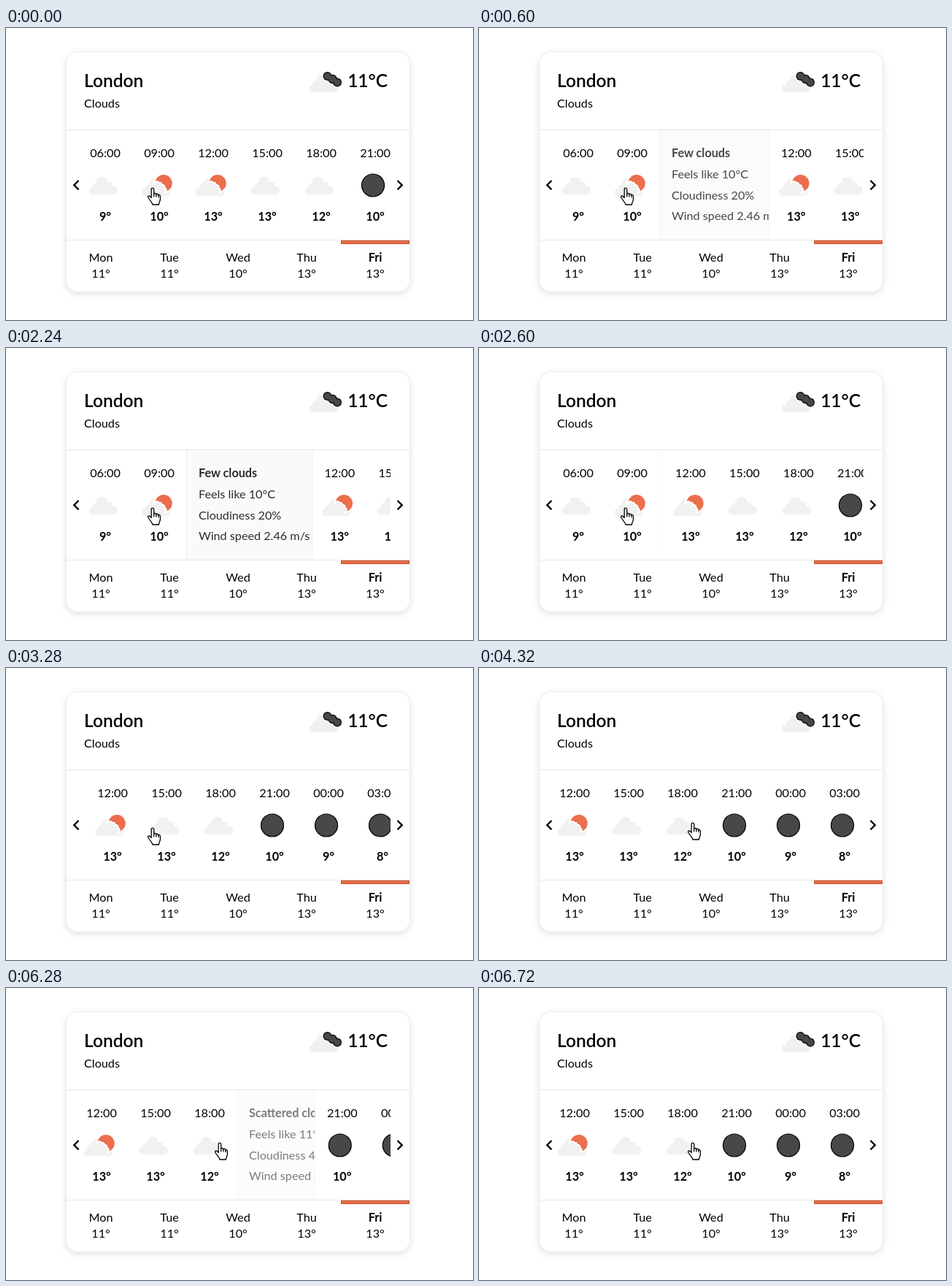
An HTML page that plays this animation: 640x400 px, repeating every 6.84 s.

```html
<!DOCTYPE html>
<html lang="en">
<head>
<meta charset="utf-8">
<title>Weather card</title>
<style>
  html, body { margin: 0; width: 100%; height: 100%; overflow: hidden; background: #fff; }
  #stage { display: block; width: 640px; height: 400px; font: 16.2px Lato, "Open Sans", sans-serif; fill: #000; }
  .mid { text-anchor: middle; }
  .bold { font-weight: 700; }
  .big { font-size: 24.5px; font-weight: 600; }
  .card { fill: #fff; stroke: #ededed; filter: drop-shadow(0 3px 5px rgba(0, 0, 0, .11)); }
  .rule { stroke: #e8e8e8; }
  .chevron { fill: none; stroke: #000; stroke-width: 2.4; }
</style>
</head>
<body>
<svg id="stage" viewBox="0 0 640 400" xmlns="http://www.w3.org/2000/svg"></svg>
<script>
const LOOP = 6840, STEP = 40;
const CELL = 74, STRIP_X = 99, PANEL_W = 209, MAX_SCROLL = 153;

const hours = [
  ["06:00", "cloud", 9], ["09:00", "sun", 10], ["12:00", "sun", 13], ["15:00", "cloud", 13],
  ["18:00", "cloud", 12], ["21:00", "moon", 10], ["00:00", "moon", 9], ["03:00", "moon", 8]
];
const days = [["Mon", 11], ["Tue", 11], ["Wed", 10], ["Thu", 13], ["Fri", 13]];
const panels = [
  { after: 1, open: 360, close: 2160,
    lines: ["Few clouds", "Feels like 10°C", "Cloudiness 20%", "Wind speed 2.46 m/s"] },
  { after: 4, open: 4640, close: 6120,
    lines: ["Scattered clouds", "Feels like 11°C", "Cloudiness 44%", "Wind speed 2.27 m/s"] }
];
const PANEL_MS = 560;

const text = (x, y, s, cls = "") => `<text x="${x}" y="${y}" class="${cls}">${s}</text>`;
const circle = (x, y, r, attrs) => `<circle cx="${x}" cy="${y}" r="${r}" ${attrs}/>`;

const cloud = (x, y) =>
  `<path transform="translate(${x} ${y})" fill="#f1f1ef"
    d="M5 24C2 24 0 21.700 0 19C0 16 2.300 14 5 14C4.500 10.500 7 8 10 8.500C10.500 3.500 14 0 18 0
       C22.500 0 25.500 3 26 7C30 6 33 8.500 33 12.500C36.500 12.500 39.500 15.300 39.500 18.700C39.500 22 37 24 34 24Z"/>`;

const icons = {
  cloud: () => cloud(-22.5, 204),
  sun: () => cloud(-24, 206) +
    `<path fill="#ec6e4c" stroke="#fff" stroke-width="4" paint-order="stroke"
      d="M-5.500 210A11.800 11.800 0 1 1 10 223.800A4 4 0 0 0 8.500 218.500A4 4 0 0 0 4.500 214
         A4 4 0 0 0 0 210.800A4 4 0 0 0 -5.500 210Z"/>`,
  moon: () => circle(-3, 215.5, 15.5, 'fill="#48484a" stroke="#000" stroke-width="1.2"')
};

const lobes = [[440.5, 66, 5.2], [447.5, 70, 5.4], [454, 74.5, 5.2]];
const darkCloud = [["#fff", 2.5], ["#000", .8], ["#48484a", -.4]]
  .map(([fill, grow]) => lobes.map(([x, y, r]) => circle(x, y, r + grow, `fill="${fill}"`)).join("")).join("");
const headerIcon = cloud(415, 64) + darkCloud;

const hourCell = ([time, icon, temp]) =>
  `<g class="hour">${text(0, 177, time, "mid")}${icons[icon]()}${text(0, 264, temp + "°", "mid bold")}</g>`;

const panelBox = ({ lines }) =>
  `<svg class="panel" y="140" height="150" overflow="hidden">
    <rect width="100%" height="150" fill="#fafafa"/>
    ${lines.map((s, i) => text(17, 37 + i * 28.8, s, i ? "" : "bold")).join("")}
    <rect width="1" height="150" fill="#ebebeb"/>
    <svg x="100%" overflow="visible"><rect x="-1" width="1" height="150" fill="#ebebeb"/></svg>
  </svg>`;

const dayCell = ([name, temp], i) =>
  text(130 + i * 94, 320, name, i === 4 ? "mid bold" : "mid") + text(130 + i * 94, 342, temp + "°", "mid");

document.getElementById("stage").innerHTML = `
  <clipPath id="view"><rect x="107" y="140" width="420" height="150"/></clipPath>
  <rect class="card" x="82.5" y="32.5" width="471" height="329" rx="16"/>
  ${text(107, 81, "London", "big")}
  ${text(107, 109, "Clouds")}
  ${headerIcon}
  <text x="523" y="81" class="big" text-anchor="end">11°C</text>
  <g clip-path="url(#view)">${hours.map(hourCell).join("")}${panels.map(panelBox).join("")}</g>
  <path class="rule" d="M83 139.500H553M83 290.500H553"/>
  <path class="chevron" d="M99.500 209L93.300 215.200L99.500 221.400M536.500 209L542.700 215.200L536.500 221.400"/>
  <rect x="459.500" y="291.500" width="93" height="4" fill="#ec6e4c" stroke="#c24f2c"/>
  ${days.map(dayCell).join("")}
  <g id="hand" fill="#fff" stroke="#000" stroke-width="1.3" stroke-linejoin="round">
    <path d="M5.500 14V2.500C5.500 0 9 0 9 2.500V9C9.500 7.500 12 7.700 12.200 9.500C13 8.200 15 8.700 15.200 10.400
      C16.300 9.500 17.700 10.300 17.700 12V16C17.700 19 16 20 15.700 23.500H7.300C7 20.500 4 18.500 1.200 14
      C0 12 2 10.800 3.500 12Z"/>
    <path fill="none" d="M9 9V13M12.200 9.500V13M15.200 10.500V13.500"/>
  </g>`;

const hourEls = document.querySelectorAll(".hour");
const panelEls = document.querySelectorAll(".panel");
const hand = document.getElementById("hand");

const progress = (t, start, ms) => Math.min(1, Math.max(0, (t - start) / ms));

// cubic-bezier(.25, .1, .25, 1), solved by bisection
function ease(x) {
  if (x <= 0 || x >= 1) return x;
  let lo = 0, hi = 1, s;
  for (let i = 0; i < 24; i++) {
    s = (lo + hi) / 2;
    if (.75 * s * (1 - s) + s ** 3 < x) lo = s; else hi = s;
  }
  return .3 * s * (1 - s) ** 2 + 3 * s * s * (1 - s) + s ** 3;
}
const easeOut = x => 1 - (1 - x) ** 4;
const easeInOut = x => x * x * (3 - 2 * x);

function draw(t) {
  const scroll = Math.round(MAX_SCROLL * easeOut(progress(t, 3000, 640)));
  const left = STRIP_X - scroll;
  const grown = panels.map(p => ease(progress(t, p.open, PANEL_MS)) - ease(progress(t, p.close, PANEL_MS)));

  hourEls.forEach((el, i) => {
    const push = panels.reduce((sum, p, k) => sum + (i > p.after ? PANEL_W * grown[k] : 0), 0);
    el.setAttribute("transform", `translate(${left + (i + .5) * CELL + push} 0)`);
  });
  panelEls.forEach((el, k) => {
    el.setAttribute("x", left + (panels[k].after + 1) * CELL);
    el.setAttribute("width", PANEL_W * grown[k]);
    el.style.display = grown[k] > .001 ? "" : "none";
    el.style.opacity = grown[k];
  });

  const move = easeInOut(progress(t, 3760, 560));
  hand.setAttribute("transform", `translate(${193.7 + 92 * move} ${218.5 - 7 * move})`);
}

const begin = performance.now();
function tick() {
  const t = (performance.now() - begin) % LOOP;
  draw(Math.floor(t / STEP) * STEP);
  requestAnimationFrame(tick);
}
draw(0);
requestAnimationFrame(tick);
</script>
</body>
</html>
```
